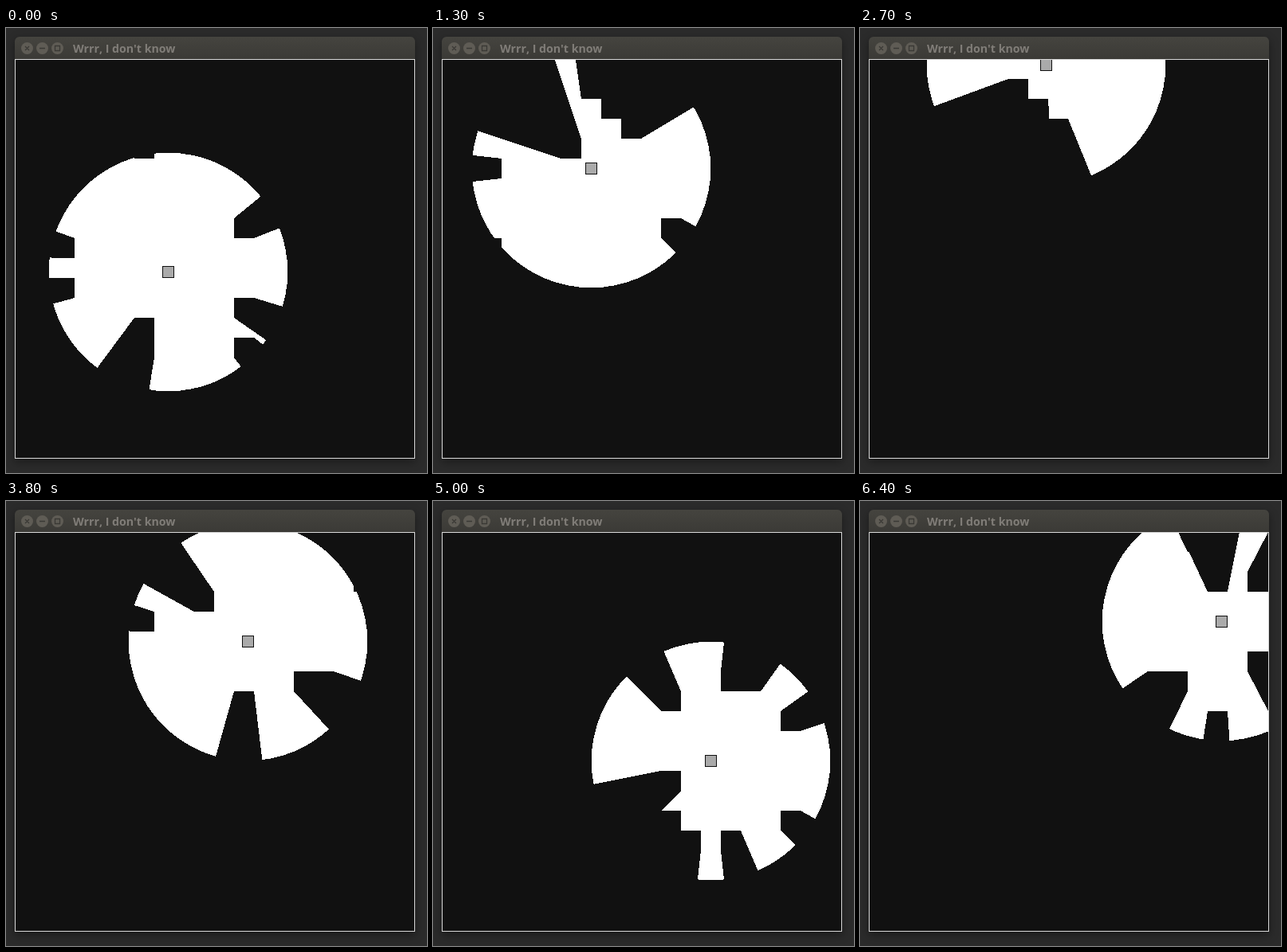
Animation of 528x559 px, one loop 6500 ms. Source, as an HTML page:

```html
<!DOCTYPE html>
<html lang="en">
<head>
<meta charset="utf-8">
<title>Line of sight</title>
<style>
  html, body { margin: 0; width: 100%; height: 100%; overflow: hidden; background: #2b2b2b; }
  body > svg { display: block; position: absolute; left: 0; top: 0; }
  #window {
    position: absolute; left: 11px; top: 11px; width: 502px; height: 530px;
    border-radius: 6px 6px 0 0; box-shadow: 0 4px 12px rgba(0, 0, 0, .4);
    background: linear-gradient(#45443f, #3b3a36 28px);
  }
  text { font: bold 14.2px "Open Sans", "Noto Sans", sans-serif; fill: #807d78; }
</style>
</head>
<body>
<div id="window"></div>
<svg width="528" height="559">
  <g fill="#5f5c55">
    <circle cx="26.5" cy="25.5" r="7.5"/>
    <circle cx="45.5" cy="25.5" r="7.5"/>
    <circle cx="64.5" cy="25.5" r="7.5"/>
  </g>
  <path d="M24 23l5 5m0-5l-5 5M42 25.5h7M61.5 22.5h6v6h-6z" fill="none" stroke="#3a3935" stroke-width="1.3"/>
  <text x="84" y="31">Wrrr, I don't know</text>
  <rect x="11.5" y="39.5" width="501" height="501" fill="#111" stroke="#d9d9d9"/>
  <svg x="12" y="40" width="500" height="500" viewBox="12 40 500 500" shape-rendering="crispEdges">
    <circle id="light" r="149.8" fill="#fff"/>
    <g id="shadows" fill="#111"></g>
    <rect id="player" width="14" height="14" fill="#aaa" stroke="#111"/>
  </svg>
</svg>
<script>
const LEFT = 11, TOP = 39, CELL = 25, FAR = 60;
const STEP = 100, STEPS = 65, TICKS = 3, SPEED = 5;

// Wall squares: column letter, row number
const walls = 'Q0 H1 I2 R2 T2 J3 G4 C5 T6 O7 P7 L8 C9 R9 C11 L12 G13 G14 L14 R14 M15 O15'
  .split(' ').map(s => [s.charCodeAt(0) - 65, +s.slice(1)]);

// Keys held (up, down, left, right, - for none) and for how many ticks;
// a doubled key catches up on missed moves
const keys = `R6 RU1 U11 UL2 L6 -1 U12 L1 U13 -1 L3 U13 R2 -6 RRR3
  R5 RD5 D8 RD1 D2 RD1 D7 -2 RD2 DL1 D5 DL6 D8 DR5 R2 RD5 R4
  RR1 R9 RU2 RU3 U9 UU1 RU2 RU3 UU2 U10`;

const path = [[203.5, 306.5]];
for (const [, held, ticks] of keys.matchAll(/([A-Z-]+)(\d+)/g)) {
  const count = key => held.split(key).length - 1;
  const dx = SPEED * (count('R') - count('L')), dy = SPEED * (count('D') - count('U'));
  for (let i = 0; i < ticks; i++) {
    const [x, y] = path.at(-1);
    path.push([x + dx, y + dy]);
  }
}

const [light, shadows, player] = ['light', 'shadows', 'player'].map(id => document.getElementById(id));
const set = (el, attrs) => { for (const k in attrs) el.setAttribute(k, attrs[k]); };

// A cell and the four areas its edges hide from the light
function shadow([col, row], cx, cy) {
  const x = LEFT + col * CELL, y = TOP + row * CELL;
  const corners = [[x, y], [x + CELL, y], [x + CELL, y + CELL], [x, y + CELL]];
  const cast = ([px, py]) => [cx + (px - cx) * FAR, cy + (py - cy) * FAR];
  const hidden = corners.map((a, i) => {
    const b = corners[(i + 1) % 4];
    return [a, b, cast(b), cast(a)];
  });
  return [corners, ...hidden].map(pts => `<polygon points="${pts.join(' ')}"/>`).join('');
}

let shown = -1;
function draw(now) {
  const step = Math.floor(now / STEP) % STEPS;
  if (step === shown) return;
  shown = step;
  const [x, y] = path[step * TICKS];
  set(light, { cx: x, cy: y });
  set(player, { x: x - 7, y: y - 7 });
  shadows.innerHTML = walls.map(w => shadow(w, x, y)).join('');
}

const start = performance.now();
function loop() {
  draw(performance.now() - start);
  requestAnimationFrame(loop);
}
loop();
</script>
</body>
</html>
```
